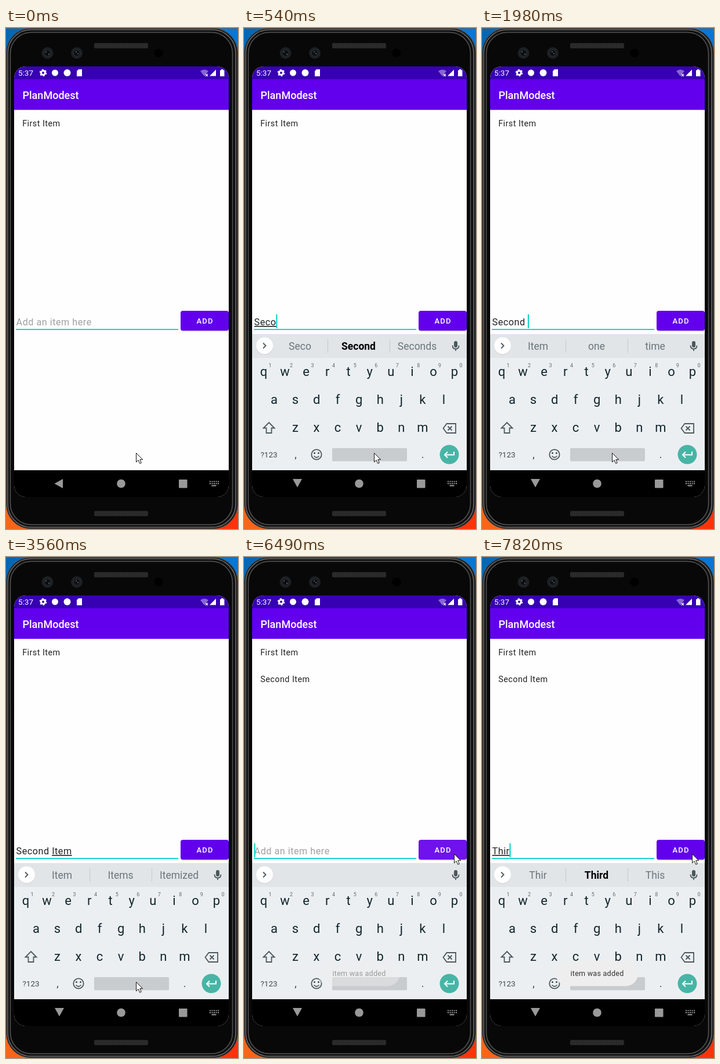
Write an HTML page that moves like this. It is 400 px wide and 861 px high and loops after 8 s.

```html
<!DOCTYPE html>
<html lang="en">
<head>
<meta charset="utf-8">
<title>To-do list demo</title>
<style>
  html, body { margin: 0; width: 100%; height: 100%; overflow: hidden; background: #000; }
  svg { display: block; font-family: Roboto, sans-serif; }
  text { white-space: pre; }
  .mid { text-anchor: middle; }
  .body { letter-spacing: .03125em; }
  .item { font-size: 14.4px; fill: #222; }
  .field { font-size: 16.2px; }
  .under { text-decoration: underline 1px; }
  .hint { font-size: 9px; fill: #5d6a70; }
  .key { font-size: 22px; fill: #10262e; }
  .line { fill: none; stroke: #4b585e; stroke-width: 1.8; }
</style>
</head>
<body>
<svg width="400" height="861" viewBox="0 0 400 861">
  <defs>
    <linearGradient id="sky"><stop stop-color="#0567b4"/><stop offset="1" stop-color="#0877d6"/></linearGradient>
    <linearGradient id="fire"><stop stop-color="#f8661a"/><stop offset="1" stop-color="#ff3208"/></linearGradient>
    <pattern id="mesh" width="3" height="3" patternUnits="userSpaceOnUse">
      <rect width="3" height="3" fill="#303030"/><path d="M0 0h1.5v1.5h-1.5z" fill="#171717"/>
    </pattern>
    <clipPath id="screen"><rect x="14" y="66" width="370" height="740" rx="20"/></clipPath>
  </defs>

  <!-- Desktop and phone body -->
  <rect width="400" height="430" fill="url(#sky)"/>
  <rect y="430" width="400" height="431" fill="url(#fire)"/>
  <g fill="#080808">
    <rect x=".5" y=".5" width="399" height="860" rx="42" fill="#1c1c1c" stroke="#4a4a4a"/>
    <rect x="3" y="3" width="393" height="855" rx="40" fill="#101010" stroke="#6e6e6e" stroke-width="1.500"/>
    <rect x="7.500" y="7.500" width="383" height="846" rx="36" stroke="#555" stroke-width="1.500"/>
  </g>
  <path d="M0 .5H400" stroke="#5c6064"/>
  <rect x="152" y="26" width="93" height="9" rx="2" fill="url(#mesh)"/>
  <rect x="152" y="830" width="93" height="9" rx="2" fill="url(#mesh)"/>
  <g fill="#1d2023">
    <circle cx="71.5" cy="43" r="10"/><circle cx="122" cy="43" r="10"/>
    <g fill="#0b0e12" stroke="#2c3238"><circle cx="71.5" cy="43" r="5.5"/><circle cx="122" cy="43" r="5.5"/></g>
    <path d="M68 41h2m3 4h2m45-4h2m1 3h2" stroke="#6c747b" stroke-width="1.5"/>
    <circle cx="263" cy="43" r="7.5" fill="#000"/>
  </g>

  <g clip-path="url(#screen)">
    <rect x="14" y="66" width="370" height="740" fill="#fefefe"/>
    <rect x="14" y="66" width="370" height="22" fill="#3700b3"/>
    <rect x="14" y="88" width="370" height="52.700" fill="#6200ee"/>

    <!-- Status bar -->
    <g fill="#fff">
      <text x="21" y="82" font-size="13.5">5:37</text>
      <circle cx="64" cy="77" r="3.5" fill="none" stroke="#fff" stroke-width="3"/>
      <circle cx="64" cy="77" r="5.5" fill="none" stroke="#fff" stroke-width="1.6" stroke-dasharray="2.88"/>
      <circle cx="84.5" cy="77" r="5.5"/><circle cx="105.5" cy="77" r="6"/>
      <path d="M125 71h6v12h-9v-9z"/>
      <path d="M335 74q7-5 14 0l-7 9z" opacity=".4"/>
      <path d="M344 79l4 4m0-4l-4 4" stroke="#fff" stroke-width="1.2"/>
      <path d="M351.5 82.500V82L362 71.500v11z"/>
      <path d="M369 72.500h2v-1.500h3.500v1.500h2v10.500h-7.500z"/>
      <text x="28.500" y="122" font-size="18" font-weight="500">PlanModest</text>
    </g>

    <text class="body item" x="28.200" y="169">First Item</text>
    <text class="body item" x="28.200" y="214.500" id="second">Second Item</text>

    <!-- Input row -->
    <text class="body field" x="17.600" y="511" fill="#a0a0a0" id="placeholder">Add an item here</text>
    <text class="body field" x="17.600" y="511" fill="#222" id="field"><tspan id="done"></tspan><tspan id="typing" class="under"></tspan></text>
    <rect x="17" y="517.200" width="280" height="1.800" fill="#03d0c4"/>
    <rect y="492" width="2" height="24" fill="#03d0c4" id="caret"/>
    <rect x="301" y="487.500" width="83" height="34" rx="4" fill="#000" opacity=".2"/>
    <rect x="301" y="486" width="83" height="34" rx="4" id="button"/>
    <text class="mid" x="343" y="508" font-size="13" font-weight="500" letter-spacing="1.150" fill="#fff">ADD</text>

    <!-- Keyboard -->
    <g id="keyboard">
      <rect x="14" y="526" width="370" height="236" fill="#eceff1"/>
      <rect x="14" y="526" width="370" height="41" fill="#e1e5e8"/>
      <circle cx="35.500" cy="547" r="14.500" fill="#c8ccd0"/>
      <circle cx="35.500" cy="546" r="14.500" fill="#fff"/>
      <path class="line" d="M33 541.500l4.500 4.500l-4.500 4.500"/>
      <path d="M144.500 535v23M251.500 535v23" stroke="#c3c8cb" id="dividers"/>
      <g id="words" font-size="17.500"></g>
      <rect x="362" y="538" width="6" height="11" rx="3" fill="#4b585e"/>
      <path class="line" d="M359.500 545.500q0 6 5.500 6t5.500-6M365 551v4"/>
      <g id="keys"></g>
      <path class="line" d="M43 678l9.500 9.500h-5v8.500h-9v-8.500h-5z"/>
      <path class="line" d="M349.500 680h15.500v16h-15.500l-6-8zM351.500 684.500l7 7m0-7l-7 7"/>
      <g fill="#3c4a50">
        <text class="mid" x="43" y="738" font-size="13.500">?123</text>
        <text class="mid" x="89" y="739" font-size="18">,</text>
        <text class="mid" x="308" y="739" font-size="18">.</text>
        <circle cx="121.500" cy="730.500" r="1.500"/><circle cx="128.500" cy="730.500" r="1.500"/>
      </g>
      <circle class="line" cx="125" cy="733" r="8.700"/>
      <path class="line" d="M120.500 735.500q4.500 5 9 0"/>
      <rect x="152" y="722" width="129" height="22.500" rx="2" fill="#c8cccf"/>
      <circle cx="354" cy="733" r="16.500" fill="#47b5a6"/>
      <path d="M362 728v5.500h-16m5-5l-5 5l5 5" fill="none" stroke="#fff" stroke-width="2"/>
    </g>

    <g id="toast">
      <rect x="127" y="694" width="142" height="43.500" rx="21.500" fill="#eee"/>
      <text class="mid" x="198.500" y="720" font-size="12.600" letter-spacing=".23" fill="#333">item was added</text>
    </g>

    <!-- Navigation bar -->
    <rect x="14" y="760" width="370" height="46" fill="#000"/>
    <g fill="#999">
      <path id="back"/>
      <circle cx="198.500" cy="783" r="7.300"/>
      <rect x="298" y="776" width="14.500" height="14.500" rx="1"/>
      <path d="M351 779.500h16M351 783h16" stroke="#999" stroke-width="2" stroke-dasharray="2 1.500"/>
      <path d="M354.500 786.500h8" stroke="#999" stroke-width="2"/>
    </g>
  </g>

  <path id="pointer" d="M.5.500v15.500l3.600-3.400l2.600 5.800l2.600-1.100l-2.500-5.600h4.900z" fill="#fff" stroke="#111"/>
</svg>

<script>
const LOOP = 8000;
const $ = id => document.getElementById(id);

function addText(parent, x, y, cls, content = '') {
  const el = document.createElementNS('http://www.w3.org/2000/svg', 'text');
  el.setAttribute('x', x);
  el.setAttribute('y', y);
  el.setAttribute('class', 'mid ' + cls);
  el.textContent = content;
  return parent.appendChild(el);
}

const PITCH = 36.55;
const letterKeys = [['qwertyuiop', 34, 598], ['asdfghjkl', 52, 646], ['zxcvbnm', 88.5, 694]]
  .flatMap(([row, x, y]) => [...row].map((c, i) => addText($('keys'), x + i * PITCH, y, 'key', c)));
[...'1234567890'].forEach((d, i) => addText($('keys'), 45 + i * PITCH, 583, 'hint', d));
const words = [96.5, 197.5, 298.5].map(x => addText($('words'), x, 553, ''));

// Each step overrides only what changes; '*' marks the bold suggestion.
const steps = [
  { at: 0, done: '', typing: '', words: '', caret: false, slide: 240, caps: false,
    added: false, pressed: false, toast: 0, pointer: [224, 730] },
  { at: 150, slide: 110, caret: true },
  { at: 270, slide: 0, typing: 'S' },
  { at: 390, typing: 'Se', words: 'Se|*See|Seen' },
  { at: 540, typing: 'Seco', words: 'Seco|*Second|Seconds' },
  { at: 1070, typing: 'Secon', words: 'Secon|*Second|Seconds' },
  { at: 1220, typing: 'Second' },
  { at: 1340, words: 'Second|Seconds|Secondary' },
  { at: 1740, done: 'Second ', typing: '' },
  { at: 1860, words: 'Item|one|time' },
  { at: 2450, typing: 'I', words: 'I|I will|Invited' },
  { at: 2600, typing: 'It', words: 'It|It\u2019s|Its' },
  { at: 2880, typing: 'Ite', words: 'Ite|*Item|Its' },
  { at: 3030, typing: 'Item', words: 'Item|Items|Itemized' },
  { at: 3560, caret: false }, { at: 3960, caret: true },
  { at: 4460, caret: false }, { at: 5050, caret: true },
  { at: 5450, caret: false }, { at: 5970, caret: true },
  { at: 6250, pointer: [388, 560] },
  { at: 6370, pointer: [362, 510], pressed: true, added: true, done: '', typing: '', words: '' },
  { at: 6490, toast: .45 },
  { at: 6640, toast: .9, pressed: false },
  { at: 6760, toast: 1, caret: false },
  { at: 7160, caps: true, caret: true },
  { at: 7280, caps: false, typing: 'T', words: 'T|The|That' },
  { at: 7560, typing: 'Th', words: 'Th|The|There' },
  { at: 7680, typing: 'Thi', words: 'Thi|*Third|This' },
  { at: 7820, typing: 'Thir', words: 'Thir|*Third|This' },
];

const show = (id, visible) => $(id).setAttribute('visibility', visible ? 'visible' : 'hidden');

function render(time) {
  const s = Object.assign({}, ...steps.filter(step => step.at <= time));
  const keyboardOpen = s.slide < 240;

  $('done').textContent = s.done;
  $('typing').textContent = s.typing;
  $('caret').setAttribute('x', 17.4 + ($('field').getComputedTextLength() || 0));
  show('caret', s.caret);
  show('placeholder', !s.done && !s.typing);
  show('second', s.added);
  $('button').setAttribute('fill', s.pressed ? '#6f12ee' : '#6200ee');

  show('keyboard', keyboardOpen);
  $('keyboard').setAttribute('transform', `translate(0 ${s.slide})`);
  letterKeys.forEach(k => k.style.textTransform = s.caps ? 'uppercase' : 'none');
  $('dividers').setAttribute('opacity', s.words ? 1 : 0);
  const list = s.words.split('|');
  words.forEach((el, i) => {
    const word = list[i] || '', bold = word[0] === '*';
    el.textContent = bold ? word.slice(1) : word;
    el.setAttribute('font-weight', bold ? 700 : 400);
    el.setAttribute('fill', bold ? '#000' : '#6b757a');
  });

  $('toast').setAttribute('opacity', s.toast);
  $('back').setAttribute('d', keyboardOpen ? 'M84 775h16l-8 14.500z' : 'M83.500 783l14.500-8v16z');
  $('pointer').setAttribute('transform', `translate(${s.pointer})`);
}

const start = performance.now();
function tick() {
  render((performance.now() - start) % LOOP);
  requestAnimationFrame(tick);
}
tick();
</script>
</body>
</html>
```
